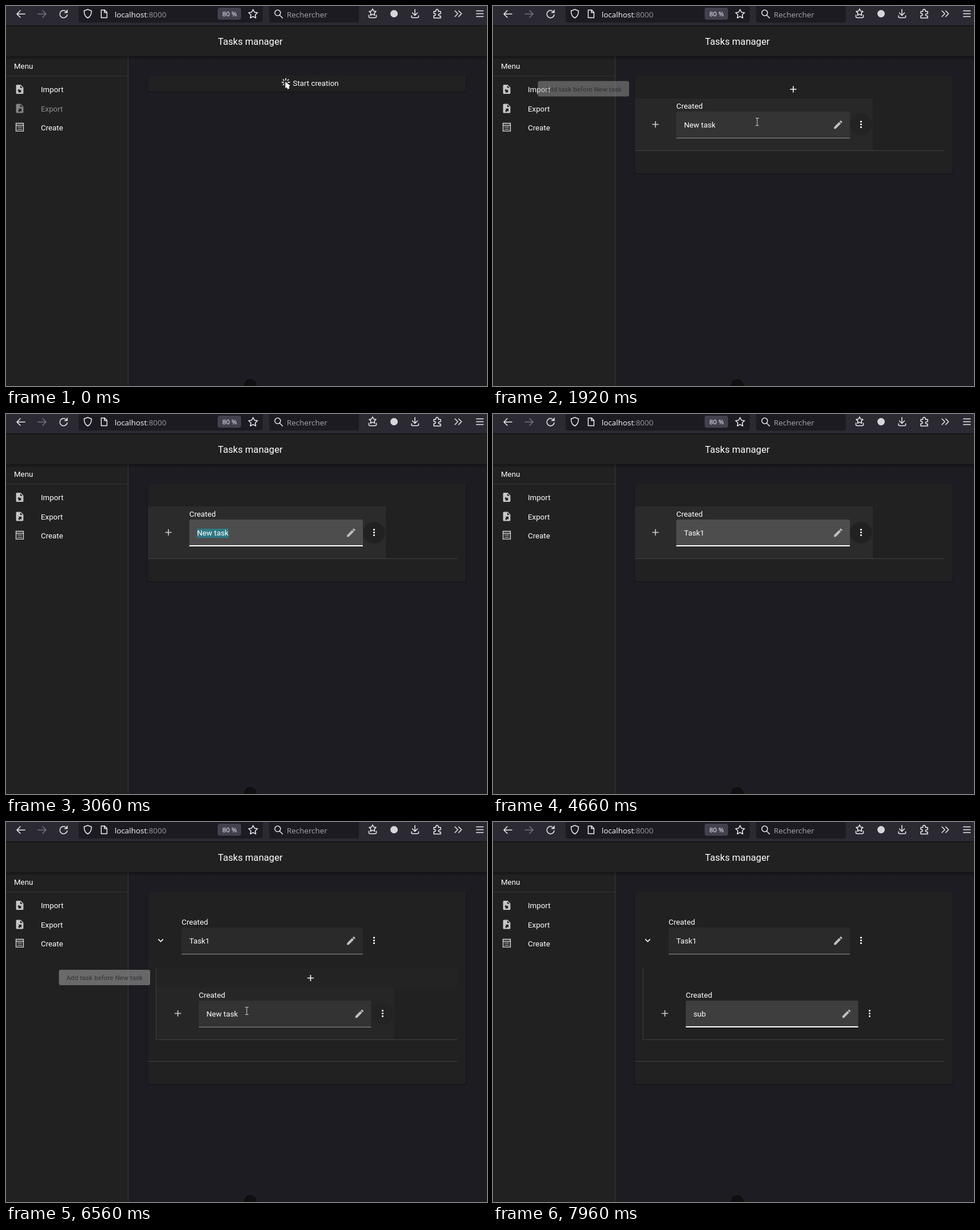
These frames come from a looping animation (841 by 666 pixels, 8 s). An HTML page:

```html
<!DOCTYPE html>
<html lang="en">
<head>
<meta charset="utf-8">
<title>Tasks manager</title>
<style>
  html, body { margin: 0; height: 100%; overflow: hidden; background: #1d1c22; }
  svg { display: block; }
  text { font: 13.3px Roboto, sans-serif; fill: #fff; }
  text.title { font-size: 16.6px; }
  text.tip { font-size: 11.7px; fill: #424242; }
  .chrome text { font: 13.4px "Open Sans", sans-serif; fill: #fbfbfe; }
  .chrome text.small { font-size: 11.4px; }
  .line { fill: none; stroke: #ececf0; stroke-width: 1.5; stroke-linecap: round; stroke-linejoin: round; }
</style>
</head>
<body>
<svg id="stage" width="841" height="666" viewBox="0 0 841 666">
  <defs>
    <linearGradient id="shade" x2="0" y2="1">
      <stop stop-color="#000" stop-opacity=".4"/><stop offset="1" stop-color="#000" stop-opacity="0"/>
    </linearGradient>
  </defs>
  <rect width="841" height="666" fill="#1d1c22"/>
  <rect y="88" width="213" height="578" fill="#212121"/>
  <path d="M213.5 88V666" stroke="#3a3a3c"/>
  <path d="M0 122.5H213" stroke="#343434"/>
  <rect y="35" width="841" height="53" fill="#212121"/>
  <rect y="88" width="841" height="6" fill="url(#shade)"/>
  <text class="title" x="427" y="67.5" text-anchor="middle">Tasks manager</text>
  <text x="14" y="110">Menu</text>

  <g class="chrome">
    <rect width="841" height="34" fill="#2b2a33"/>
    <rect y="34" width="841" height="1" fill="#0c0c0d"/>
    <path d="M127 0H449V25a4 4 0 0 1-4 4H131a4 4 0 0 1-4-4ZM460 0H617V25a4 4 0 0 1-4 4H464a4 4 0 0 1-4-4Z" fill="#1c1b22"/>
    <rect x="370" y="3" width="41" height="21" rx="4" fill="#42414d"/>
    <text x="190" y="20">localhost<tspan fill="#98989f">:8000</tspan></text>
    <text x="491" y="20" style="fill:#a9a9b0">Rechercher</text>
    <text class="small" x="391" y="18" text-anchor="middle">80 %</text>
    <g class="line">
      <path d="M33 14H19M25 8l-6 6 6 6"/>
      <path d="M56 14H70M64 8l6 6-6 6" stroke="#75747c"/>
      <path d="M106 10.500a6.500 6.500 0 1 0 1 5M107 7v4.500h-4.500"/>
      <path d="M143 6l6.500 2.500c0 6-1.500 10-6.500 12.500c-5-2.500-6.500-6.500-6.500-12.500Z"/>
      <path d="M166.500 7h6l4 4v9.500h-10ZM172 7v4.500h4.500"/>
      <path id="star" d="M432 6l2.400 5 5.400.700-4 3.800 1 5.500-4.800-2.700-4.800 2.700 1-5.500-4-3.800 5.400-.700Z"/>
      <path d="M479 16.500l4.500 4.500M480 12a5 5 0 1 1-10 0a5 5 0 0 1 10 0"/>
      <path d="M641 5l1.800 3.800 4.200.600-3 3 .700 4-3.700-2-3.700 2 .700-4-3-3 4.200-.600ZM634.500 16v2.500q0 2 2 2h9q2 0 2-2v-2.500"/>
      <path d="M715 6v10M710.500 12l4.500 4.500 4.500-4.500M709 17v1.500q0 2 2 2h8.500q2 0 2-2V17"/>
      <path d="M748 9.500h3.500c-1-5 5.500-5 4.500 0h4v4c-5-1-5 5 0 4v3.500h-12v-4c4 0 4-4 0-4Z"/>
      <path d="M785 8.500l5 5-5 5M791.500 8.500l5 5-5 5"/>
      <path d="M822.500 8.500h12M822.500 13.500h12M822.500 18.500h12"/>
    </g>
    <circle cx="678.500" cy="13.500" r="6.500" fill="#d6d6da"/>
  </g>
  <g id="app"></g>
  <circle cx="427" cy="665" r="11" fill="#0f0f10"/>
  <g id="over"></g>
</svg>

<script>
const LOOP = 8000;
const app = document.getElementById('app'), over = document.getElementById('over');
const ctx = document.createElement('canvas').getContext('2d');
const FILE = 'M6,2C4.89,2 4,2.9 4,4V20A2,2 0 0,0 6,22H18A2,2 0 0,0 20,20V8L14,2H6M13,3.5L18.5,9H13V3.5';
const ICONS = {
  load: FILE + 'M10.05,11.22L12.88,14.05L15,11.93V19H7.93L10.05,16.88L7.22,14.05L10.05,11.22Z',
  save: FILE + 'M8.93,12.22H16V19.29L13.88,17.17L11.05,20L8.22,17.17L11.05,14.34L8.93,12.22Z',
  form: 'M3,3H21V22H3ZM5,5V7.500H19V5ZM5,9.500V20H19V9.500ZM7,11.500H17V13H7ZM7,16H17V17.500H7Z',
  pencil: 'M20.71,7.04C21.1,6.65 21.1,6 20.71,5.63L18.37,3.29C18,2.9 17.35,2.9 16.96,3.29L15.12,5.12L18.87,8.87M3,17.25V21H6.75L17.81,9.93L14.06,6.18L3,17.25Z',
  dots: 'M10,6a2,2 0 1,0 4,0a2,2 0 1,0-4,0M10,12a2,2 0 1,0 4,0a2,2 0 1,0-4,0M10,18a2,2 0 1,0 4,0a2,2 0 1,0-4,0',
  plus: 'M19,13H13V19H11V13H5V11H11V5H13V11H19V13Z',
  down: 'M7.41,8.58L12,13.17L16.59,8.58L18,10L12,16L6,10L7.41,8.58Z',
  click: 'M10.76,8.69A.76,.76 0 0,0 10,9.45V20.9C10,21.5 10.8,21.9 11.24,21.5L13.15,19.95L14.81,23.57C15,24 15.5,24.100 15.83,23.92L18.59,22.64C18.97,22.46 19.15,22 18.95,21.63L17.28,18L19.69,17.55C20.300,17.400 20.500,16.600 20,16.21L11.26,8.86ZM15,10V8H20V10ZM13.83,4.76L16.66,1.93L18.07,3.34L15.24,6.17ZM10,0H12V5H10ZM3.93,14.66L6.76,11.83L8.17,13.24L5.34,16.07ZM3.93,3.34L5.34,1.93L8.17,4.76L6.76,6.17ZM7,10H2V8H7Z'
};
// time, x, y, pointer shape from then on
const MOUSE = [
  [210, 430, 690, 'arrow'], [700, 486, 150, 'hand'], [850, 489, 135, 'hand'], [1500, 489, 135, 'hand'],
  [1780, 473, 170, 'beam'], [1920, 462, 203, 'beam'], [2220, 462, 203, 'beam'], [2600, 252, 213, 'arrow'],
  [4920, 252, 213, 'arrow'], [5150, 274, 208, 'hand'], [5300, 284, 207, 'hand'], [5800, 284, 207, 'hand'],
  [5900, 292, 217, 'arrow'], [6150, 320, 262, 'hand'], [6400, 388, 294, 'beam'], [6560, 421, 331, 'beam'],
  [6850, 421, 331, 'beam'], [7330, 236, 350, 'arrow'], [LOOP, 236, 350, 'arrow']
];
const SHAPES = {
  arrow: '<path d="M0 0V15.500l3.600-3.400 2.500 5.200 2.300-1-2.400-5.100h5Z" fill="#fff" stroke="#000" stroke-width=".8"/>',
  hand: '<path d="M-1.500 1.500a1.600 1.600 0 0 1 3.200 0V7l1.500-.5 1.600 1 1.600-.3 1.500 1.200 1.500.400V13q0 3-2 5.500H-1Q-4 14.500-6 11.500q-.500-2 2-1.700l2.500 2Z" fill="#fff" stroke="#222" stroke-width=".8"/><path d="M1.700 7v4M4.600 8v3.500M7.400 8.700v3" stroke="#222" stroke-width=".7"/>',
  beam: '<path d="M-3-6.500H-1L0-6 1-6.500H3M0-6V6M-3 6.500H-1L0 6 1 6.500H3" fill="none" stroke="#d4d4d4"/>'
};
const PRESSES = [[970, 1370], [2190, 2600], [5540, 5680], [6800, 7300]];

const ramp = (t, a, b) => Math.min(1, Math.max(0, (t - a) / (b - a)));
const pulse = (t, a, b, c, d) => ramp(t, a, b) * (1 - ramp(t, c, d));
const ease = k => k * k * (3 - 2 * k);
const within = (t, a, b) => t >= a && t < b;
const width = (s, size = 13.3) => (ctx.font = size + 'px Roboto, sans-serif', ctx.measureText(s).width);
const rect = (x, y, r, b, fill, alpha = 1, rx = 0) =>
  `<rect x="${x}" y="${y}" width="${Math.max(0, r - x)}" height="${Math.max(0, b - y)}" rx="${rx}" fill="${fill}" opacity="${alpha}"/>`;
const label = (s, x, y, alpha = 1) => `<text x="${x}" y="${y}" opacity="${alpha}">${s}</text>`;
const icon = (name, x, y, fill = '#fff', alpha = 1) =>
  `<path transform="translate(${x - 9.6} ${y - 9.6}) scale(.8)" d="${ICONS[name]}" fill="${fill}" fill-rule="evenodd" opacity="${alpha}"/>`;

function tip(s, right, y, alpha) {
  const w = width(s, 11.7);
  return `<g opacity="${alpha * .93}">${rect(right - w - 26, y - 13.5, right, y + 13.5, '#a3a3a3', 1, 3)}` +
    `<text class="tip" x="${right - w - 13}" y="${y + 4.500}">${s}</text></g>`;
}

function field(x, y, right, s, o) {
  const tx = x + 13.5, mid = (x + right) / 2, half = (right - x) / 2 * o.focus;
  return label('Created', x, y - 5) +
    rect(x, y, right, y + 46, '#fff', .04 + .03 * o.hover + .09 * o.focus, 3) +
    rect(x, y + 46, right, y + 47, '#949494') +
    rect(mid - half, y + 45, mid + half, y + 47, '#fff') +
    (o.pick < 1e3 ? rect(Math.max(tx, o.pick), y + 16, tx + width(s), y + 32, '#2f7a86') : '') +
    label(s, tx, y + 28) +
    (o.caret ? rect(Math.round(tx + width(s)), y + 16, Math.round(tx + width(s)) + 1, y + 32, '#fff') : '') +
    icon('pencil', right - 20.5, y + 23, '#c0c0c0');
}

function row(x, y, right, bottom, hover) {
  return rect(x, y, right, bottom, '#fff', .045 * hover) +
    `<circle cx="${right - 20.5}" cy="${y + 46}" r="19" fill="#212121" opacity="${hover}"/>` +
    icon('dots', right - 20.5, y + 45.5);
}

function typed(t, keys, first) {
  let s = first;
  for (const [at, value] of keys) if (t >= at) s = value;
  return s;
}

function pointer(t) {
  let i = 0;
  while (i < MOUSE.length - 2 && t >= MOUSE[i + 1][0]) i++;
  const [a, x, y, shape] = MOUSE[i], [b, x2, y2] = MOUSE[i + 1], k = ramp(t, a, b);
  return { x: x + (x2 - x) * k, y: y + (y2 - y) * k, shape };
}

function menu(t) {
  const on = t >= 1370 ? 1 : .5;
  return icon('load', 24, 146, '#c8c8c8') + label('Import', 61, 151) +
    icon('save', 24, 179.5, '#c8c8c8', on + (on < 1 ? .1 : 0)) + label('Export', 61, 184.5, on) +
    icon('form', 24, 212, '#c8c8c8') + label('Create', 61, 217.5);
}

function starter(t) {
  const k = ramp(t, 700, 850), ripple = ramp(t, 890, 1180);
  return rect(248, 122, 804, 150 + 20.5 * k, '#fff', .055 * k, 3) +
    `<clipPath id="box">${rect(248, 122, 804, 170.5, '#fff', 1, 3)}</clipPath>` +
    `<circle clip-path="url(#box)" cx="${489 + 29 * ripple ** 2}" cy="140" r="${243 * ripple}" fill="#fff" opacity=".1"/>` +
    icon('click', 490, 136) + label('Start creation', 501.5, 140) + icon('plus', 531, 157, '#fff', k);
}

function tasks(t, m, end) {
  const split = t >= 5680;
  let s = rect(248, 122, 804, 162, '#fff', .05 * (1 - ramp(t, 1780, 1900))) +
    icon('plus', 525, 146, '#fff', 1 - ramp(t, 1930, 2120)) +
    row(248, 162, 664, 253, pulse(t, 1850, 1950, 6100, 6200)) +
    (split ? icon('down', 270.5, 207.5) : icon('plus', 284, 207.5, '#d0d0d0'));
  if (within(t, 5540, 5680))
    s += `<circle cx="284" cy="207.500" r="${19 * ramp(t, 5540, 5660)}" fill="#fff" opacity=".12"/>`;
  s += field(split ? 307 : 320.5, 185, 624,
    typed(t, [[3130, 'T'], [3330, 'Ta'], [3530, 'Tas'], [3660, 'Task'], [4260, 'Task1']], 'New task'), {
      hover: pulse(t, 1880, 1960, 5100, 5200),
      focus: pulse(t, 2190, 2340, 5540, 5640),
      pick: within(t, 2220, 3130) ? m.x : 1e3,
      caret: within(t, 3130, 4130) || within(t, 4260, 4660)
    });
  if (t >= 5740) s += `<clipPath id="fold">${rect(248, 253, 804, end, '#fff')}</clipPath><g clip-path="url(#fold)">` +
    rect(262, 257, 789, 290, '#fff', .05 * pulse(t, 6150, 6250, 6380, 6600)) +
    icon('plus', 532.5, 273.5, '#fff', pulse(t, 6150, 6250, 6570, 6750)) +
    row(262, 290, 679, 381, pulse(t, 6450, 6650, 7230, 7330)) +
    '<path d="M262.500 256V381.500H789" fill="none" stroke="#404040"/>' +
    icon('plus', 300.5, 335.5, '#d0d0d0') +
    field(337, 313, 638.5, typed(t, [[7490, 's'], [7690, 'su'], [7760, 'sub']], 'New task'), {
      hover: pulse(t, 6500, 6600, 7200, 7300),
      focus: ramp(t, 6800, 6950),
      pick: within(t, 6850, 7490) ? m.x : 1e3,
      caret: within(t, 7490, 7960)
    }) + '</g>';
  return s + rect(248, end, 789, end + 1, '#424242');
}

function draw(t) {
  const m = pointer(t), end = 253 + 166 * ease(ramp(t, 5740, 5990));
  const bottom = t < 1370 ? 150 + 20.5 * ramp(t, 700, 850) : end + 40.5;
  app.innerHTML = menu(t) + rect(247, 123, 805, bottom + 1.5, '#000', .3, 3) +
    rect(248, 122, 804, bottom, '#212121', 1, 3) + (t < 1370 ? starter(t) : tasks(t, m, end));

  const hidden = within(t, 3060, 4920) || t >= 7420 || t < 210;
  const press = PRESSES.some(([a, b]) => within(t, a, b));
  over.innerHTML = tip('Add task', 239, 146, t < 1370 ? ramp(t, 750, 900) : 0) +
    tip('Add task before New task', 238, 145, pulse(t, 1370, 1500, 1850, 1990)) +
    tip('Add task in Task1', 256, 207.5, pulse(t, 5170, 5300, 5560, 5680)) +
    tip('Add task before New task', 252, 272.5, pulse(t, 6170, 6300, 6470, 6700)) +
    (hidden ? '' : `<g transform="translate(${m.x} ${m.y})">` +
      (press ? '<circle r="10" fill="#d6ca12" opacity=".65"/>' : '') + SHAPES[m.shape] + '</g>');
}

function tick(now) {
  draw(now % LOOP);
  requestAnimationFrame(tick);
}
draw(0);
requestAnimationFrame(tick);
</script>
</body>
</html>
```
